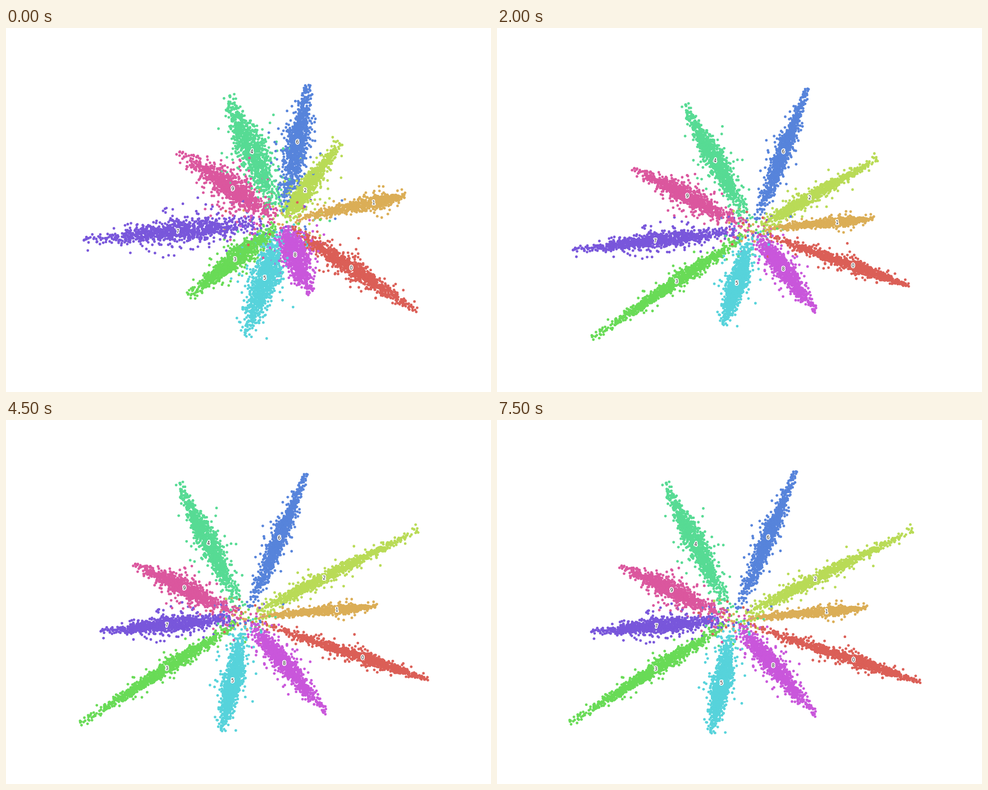
Write an HTML page with a canvas that moves like this. It is 864 by 648 pixels and loops after 8000 ms.

```html
<!DOCTYPE html>
<html lang="en">
<head>
<meta charset="utf-8">
<title>Ten clusters</title>
<style>
html, body { margin: 0; width: 100%; height: 100%; overflow: hidden; background: #fff; }
canvas { display: block; }
</style>
</head>
<body>
<canvas id="stage" width="864" height="648"></canvas>
<script>
const ctx = document.getElementById('stage').getContext('2d');
const LOOP = 8000, STEP = 500, COUNT = 1000, DOT = 2.4;
const TIMES = [0, 1500, 3000, 7500];
const HUB = [[492, 346], [455, 376], [460, 328], [422, 356]];
const clusters = [];

let seed = 20177;
function rand() {
  seed = (seed + 0x6D2B79F5) | 0;
  let n = Math.imul(seed ^ (seed >>> 15), 1 | seed);
  n = (n + Math.imul(n ^ (n >>> 7), 61 | n)) ^ n;
  return ((n ^ (n >>> 14)) >>> 0) / 4294967296;
}
const gauss = () => Math.sqrt(-2 * Math.log(1 - rand())) * Math.cos(2 * Math.PI * rand());
const lerp = (a, b, p) => a + (b - a) * p;
const mix = (a, b, p) => a.map((v, i) => lerp(v, b[i], p));

// along: -1 at the hub, 0 at the label, 1 at the tip
function makeDot(_, i) {
  let along = i ? gauss() * 0.43 : 1;
  while (Math.abs(along) > 1) along = gauss() * 0.43;
  const taper = 1 - (along > 0 ? 0.58 : 0.25) * Math.abs(along);
  const spread = rand() < 0.13 ? 2.4 : 1;
  return {
    along,
    across: gauss() * spread * taper,
    lost: i > 0 && rand() < 0.012,
    dx: gauss() * 30, dy: gauss() * 18
  };
}

// Arms run straight from the hub through the label; reach is the tip's distance in label distances.
function cluster(width, firstReach, reach, ...path) {
  const digit = clusters.length;
  clusters.push({
    digit, width, firstReach, reach, path,
    color: `hsl(${3.6 + 36 * digit}, 65%, 60%)`,
    dots: Array.from({ length: COUNT }, makeDot)
  });
}

cluster(4.5, 1.95, 1.56, [615, 427], [633, 438], [637, 394], [635, 427]);
cluster(3.2, 1.35, 1.44, [655, 311], [606, 360], [606, 317], [587, 341]);
cluster(4.7, 2.5, 2.2, [533, 289], [553, 319], [565, 268], [567, 283]);
cluster(5, 1.98, 2.1, [408, 412], [324, 460], [312, 434], [283, 443]);
cluster(8.3, 1.78, 1.8, [438, 220], [380, 250], [406, 209], [354, 221]);
cluster(8, 2.05, 1.8, [461, 445], [427, 461], [428, 439], [400, 468]);
cluster(6, 1.71, 1.8, [519, 203], [509, 222], [512, 216], [483, 209]);
cluster(6.4, 1.9, 1.84, [306, 362], [271, 393], [304, 350], [284, 367]);
cluster(7.3, 2.2, 2.1, [515, 404], [505, 440], [520, 407], [492, 437]);
cluster(7.3, 2.1, 1.82, [404, 286], [327, 311], [363, 276], [311, 303]);

function span(t) {
  let k = 0;
  while (k < TIMES.length - 2 && t >= TIMES[k + 1]) k++;
  const p = Math.min(1, (t - TIMES[k]) / (TIMES[k + 1] - TIMES[k]));
  // the last stretch settles slowly
  return [k, k === TIMES.length - 2 ? 1 - (1 - p) ** 5 : p];
}

function poseAt(c, k, p, hub, loose) {
  const [x, y] = mix(c.path[k], c.path[k + 1], p);
  const vx = x - hub[0], vy = y - hub[1], len = Math.hypot(vx, vy);
  return {
    x, y, vx, vy, nx: -vy / len, ny: vx / len,
    width: c.width * (1 + 0.5 * loose),
    out: lerp(c.reach, c.firstReach, loose) - 1
  };
}

function place(dot, pose, hub, loose) {
  if (dot.lost) {
    const grow = 1 + 0.6 * loose;
    return [hub[0] + dot.dx * grow, hub[1] + dot.dy * grow];
  }
  const r = dot.along * (dot.along > 0 ? pose.out : 0.87);
  const off = dot.across * pose.width;
  return [pose.x + pose.vx * r + pose.nx * off, pose.y + pose.vy * r + pose.ny * off];
}

function draw(t) {
  const [k, p] = span(t);
  const hub = mix(HUB[k], HUB[k + 1], p);
  const loose = Math.max(0, 1 - t / TIMES[1]);
  const poses = clusters.map(c => poseAt(c, k, p, hub, loose));

  ctx.fillStyle = '#fff';
  ctx.fillRect(0, 0, 864, 648);
  for (let i = 0; i < COUNT; i++) {
    clusters.forEach((c, n) => {
      const [x, y] = place(c.dots[i], poses[n], hub, loose);
      ctx.fillStyle = c.color;
      ctx.beginPath();
      ctx.arc(x, y, DOT, 0, Math.PI * 2);
      ctx.fill();
    });
  }

  ctx.font = '8px "DejaVu Sans", sans-serif';
  ctx.textAlign = 'center';
  ctx.lineJoin = 'round';
  ctx.lineWidth = 3.5;
  ctx.strokeStyle = '#fff';
  ctx.fillStyle = '#222';
  clusters.forEach((c, n) => {
    const { x, y } = poses[n];
    ctx.strokeText(c.digit, x, y + 3);
    ctx.fillText(c.digit, x, y + 3);
  });
}

let shown = -1;
function tick() {
  const t = Math.floor((performance.now() % LOOP) / STEP) * STEP;
  if (t !== shown) draw(shown = t);
  requestAnimationFrame(tick);
}
tick();
</script>
</body>
</html>
```
